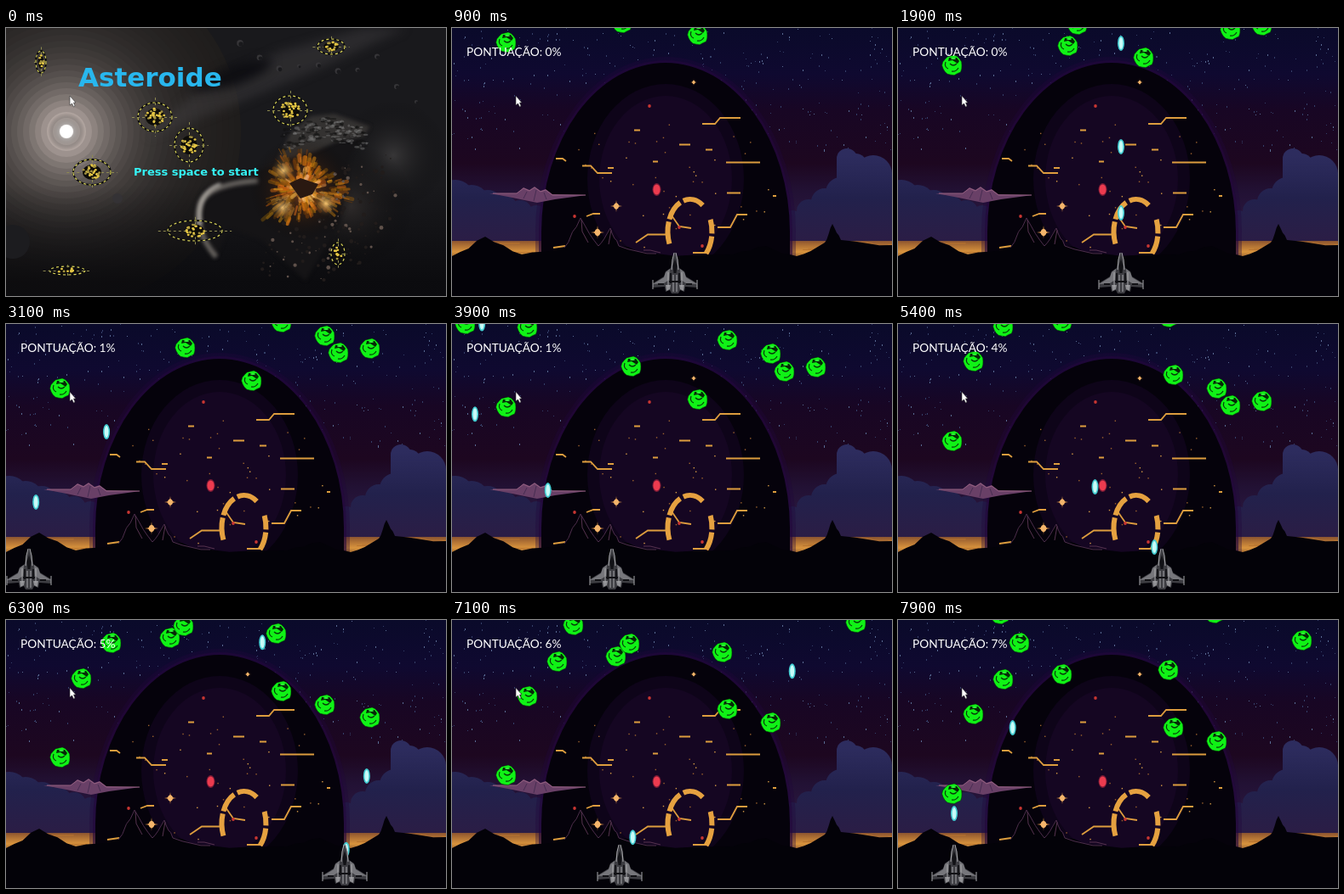
An HTML page with a canvas that plays this animation: 517 by 316 pixels, repeating every 8000 ms.

```html
<!DOCTYPE html>
<html lang="pt">
<head>
<meta charset="utf-8">
<title>Asteroide</title>
<style>
html, body { margin: 0; width: 100%; height: 100%; overflow: hidden; background: #000; }
canvas { display: block; width: 517px; height: 316px; }
</style>
</head>
<body>
<canvas id="stage" width="517" height="316"></canvas>
<script>
const W = 517, H = 316, LOOP = 8000, STEP = 100, GAME_START = 700, TAU = Math.PI * 2;
const FALL = 0.0268, BULLET_SPEED = 0.263, MUZZLE = 272, SPAWN_Y = -20, HIT_X = 16, HIT_Y = 14;
const stage = document.getElementById('stage').getContext('2d');

function randomizer(seed) {
  return () => (seed = (seed * 16807) % 2147483647) / 2147483647;
}

function layer(w, h, paint) {
  const canvas = document.createElement('canvas');
  canvas.width = w;
  canvas.height = h;
  paint(canvas.getContext('2d'));
  return canvas;
}

function fill(c, path, color) {
  c.fillStyle = color;
  c.fill(new Path2D(path));
}

function stroke(c, path, color, width = 1) {
  c.strokeStyle = color;
  c.lineWidth = width;
  c.stroke(new Path2D(path));
}

function oval(c, x, y, rx, ry, color) {
  c.fillStyle = color;
  c.beginPath();
  c.ellipse(x, y, rx, ry, 0, 0, TAU);
  c.fill();
}

function gradient(g, colors) {
  for (const [at, color] of colors) g.addColorStop(at, color);
  return g;
}

function glow(c, x, y, r, color) {
  c.fillStyle = gradient(c.createRadialGradient(x, y, 0, x, y, r), [[0, color], [1, 'transparent']]);
  c.fillRect(x - r, y - r, 2 * r, 2 * r);
}

function mirrored(c, centre, paint) {
  for (const side of [1, -1]) {
    c.save();
    c.translate(centre, 0);
    c.scale(side, 1);
    paint();
    c.restore();
  }
}

// Title screen
function paintSun(c) {
  for (let r = 205; r >= 9; r -= 7) {
    const v = 26 + 225 * Math.exp(-r / 52);
    oval(c, 71, 122, r, r, `rgb(${v * 1.03}, ${v * 0.96}, ${v * 0.93})`);
  }
  glow(c, 71, 122, 22, '#fff');
  oval(c, 71, 122, 8, 8, '#fff');
}

function paintBrokenPlanet(c, rnd) {
  c.filter = 'blur(2px)';
  fill(c, 'M221 215Q226 182 262 178L322 160 336 122 384 102 428 116 404 150 392 230 352 298 300 250 262 236 246 272Z', '#151416');
  fill(c, 'M318 158L334 124 358 104 386 101 428 116 420 128 388 134 362 146Z', '#343231');
  stroke(c, 'M247 270Q220 238 228 208Q236 184 296 180', '#66625e', 6);
  stroke(c, 'M228 232Q222 196 252 184', '#b4afa8', 4);
  c.filter = 'none';
  for (let i = 0; i < 160; i++) {
    const along = rnd(), x = 325 + along * 100;
    const y = 104 + Math.abs(along - 0.5) * 30 + rnd() * 26;
    oval(c, x, y, 1 + rnd() * 3, 0.6 + rnd() * 1.4, rnd() < 0.45 ? '#8886' : '#1118');
  }
}

function paintExplosion(c, rnd) {
  const cx = 348, cy = 190;
  glow(c, cx, cy, 62, 'rgba(150,75,28,.75)');
  c.lineCap = 'round';
  for (let i = 0; i < 420; i++) {
    const a = rnd() * TAU, near = rnd(), d = 8 + near * 44;
    const reach = 0.8 + 0.22 * Math.cos(3 * a - 0.6);
    const x = cx + Math.cos(a) * d * reach, y = cy + Math.sin(a) * d * reach * 0.9;
    const length = 2 + rnd() * 8;
    c.strokeStyle = `hsla(${24 + rnd() * 16}, 85%, ${18 + rnd() * 58 * (1.15 - near * 0.7)}%, .5)`;
    c.lineWidth = 1 + rnd() * 4;
    c.beginPath();
    c.moveTo(x, y);
    c.lineTo(x + Math.cos(a) * length, y + Math.sin(a) * length);
    c.stroke();
  }
  for (const [x, y] of [[325, 212], [326, 168], [376, 207]]) glow(c, x, y, 17, 'rgba(255,205,120,.85)');
  fill(c, 'M333 183L346 177 367 184 360 196 346 201Z', '#2a1911');
  for (let i = 0; i < 130; i++) {
    const a = rnd() * 2.6 - 0.5, d = 42 + rnd() * 68, r = 0.5 + rnd() * 2;
    oval(c, cx + Math.cos(a) * d, cy + Math.sin(a) * d, r, r, rnd() < 0.3 ? '#5f514a' : '#211c1b');
  }
}

const titleBack = layer(W, H, c => {
  const rnd = randomizer(71);
  c.fillStyle = '#19191c';
  c.fillRect(0, 0, W, H);
  paintSun(c);
  c.filter = 'blur(6px)';
  fill(c, 'M165 130L225 72 320 28 420 0H470L375 45 265 92Z', 'rgba(70,68,72,.4)');
  fill(c, 'M215 76Q260 36 312 36Q316 52 262 70Z', 'rgba(12,12,16,.9)');
  c.filter = 'none';
  c.fillStyle = gradient(c.createLinearGradient(0, 185, 0, 300), [[0, 'rgba(8,8,11,0)'], [1, 'rgba(8,8,11,.8)']]);
  c.fillRect(0, 185, W, H);
  glow(c, 455, 150, 65, 'rgba(75,73,73,.6)');
  glow(c, 405, 210, 75, 'rgba(62,56,53,.6)');
  oval(c, 8, 252, 20, 20, '#1c1c1f');
  oval(c, 131, 201, 6, 6, '#343235');
  paintBrokenPlanet(c, rnd);
  paintExplosion(c, rnd);
  for (let i = 0; i < 10; i++) {
    const x = 275 + i * 23, y = 10 + rnd() * 95, r = 2 + rnd() * 2;
    oval(c, x, y, r, r, '#363538');
    oval(c, x + 1, y + 1, r * 0.7, r * 0.7, '#19191c');
  }
});

// Centre and orbit radii
const orbiters = [[41, 40, 6, 13], [382, 22, 16, 9], [175, 105, 20, 17], [215, 138, 17, 20],
  [334, 97, 20, 17], [101, 170, 22, 15], [222, 239, 32, 12], [72, 286, 21, 5], [390, 266, 8, 13]];

function drawOrbiter(c, [x, y, rx, ry], turn) {
  const rnd = randomizer(x * 97 + y);
  const rw = Math.min(11, rx * 0.55), rh = Math.min(11, ry * 0.6);
  const orbit = new Path2D();
  orbit.ellipse(0, 0, rx, ry, 0, 0, TAU);
  c.save();
  c.translate(x, y);
  c.strokeStyle = '#0b0b0b';
  c.lineWidth = 1.8;
  c.stroke(orbit);
  c.setLineDash([3, 3]);
  c.lineDashOffset = -turn * 8;
  c.strokeStyle = '#d9d45a';
  c.lineWidth = 1.2;
  c.stroke(orbit);
  const cross = `M${-rx * 1.35} .5H${-rw}M${rw} .5H${rx * 1.35}M.5 ${-ry * 1.35}V${-rh}M.5 ${rh}V${ry * 1.35}`;
  stroke(c, cross, '#8d8950');
  c.setLineDash([]);
  oval(c, 0, 0, rw, rh, '#0d0c08');
  for (let i = 0; i < rw * rh * 0.32; i++) {
    const a = rnd() * TAU + turn, d = Math.sqrt(rnd());
    oval(c, Math.cos(a) * d * rw, Math.sin(a) * d * rh, 1.5, 1.3, rnd() < 0.7 ? '#e3c544' : '#a39240');
  }
  c.restore();
}

function drawTitle(c, t) {
  c.drawImage(titleBack, 0, 0);
  const turn = Math.min(t, 400) / 500;
  for (const o of orbiters) drawOrbiter(c, o, turn);
  c.fillStyle = '#28b7ee';
  c.font = 'bold 31px "DejaVu Sans", sans-serif';
  c.fillText('Asteroide', 85, 69);
  c.fillStyle = '#35f3f5';
  c.font = 'bold 13px "DejaVu Sans", sans-serif';
  c.fillText('Press space to start', 150, 174);
}

// Game scenery
function paintSky(c, rnd) {
  c.fillStyle = gradient(c.createLinearGradient(0, 0, 0, 275), [[0, '#0a0a2a'], [0.2, '#0f0930'],
    [0.35, '#180624'], [0.58, '#1d0720'], [0.7, '#221134'], [0.88, '#2d1a43'], [0.92, '#9a5f30'], [0.96, '#d9943d'], [1, '#6e4328']]);
  c.fillRect(0, 0, W, H);
  for (let i = 0; i < 300; i++) {
    c.fillStyle = rnd() < 0.3 ? '#596a92' : '#343f68';
    c.fillRect(Math.floor(rnd() * W), Math.floor(rnd() * 145), 1, 1 + Math.floor(rnd() * 2));
  }
  c.fillStyle = '#b9752f';
  for (let i = 0; i < 20; i++) c.fillRect(rnd() * W, 252 + rnd() * 16, 14 + rnd() * 25, 1);
}

function paintClouds(c) {
  const shade = gradient(c.createLinearGradient(0, 150, 0, 252), [[0, '#2d2c5e'], [0.5, '#22214c'], [1, '#2b1d45']]);
  const bank = (start, gap, top, slope) => {
    for (let i = 0; i < 6; i++) {
      const x = start + i * gap, r = 22 - i * 2, y = top + r + i * slope;
      oval(c, x, y, r, r, shade);
      c.fillRect(x - r, y, 2 * r, 251 - y);
    }
  };
  bank(4, 19, 179, 6);
  bank(514, -10, 172, -6);
  bank(495, -19, 150, 13);
}

function paintDome(c, rnd) {
  const dome = grow => `M${105 - grow} 275V241A${146 + grow} ${200 + grow} 0 0 1 ${397 + grow} 241V275Z`;
  fill(c, dome(7), 'rgba(32,8,57,.35)');
  fill(c, dome(3), 'rgba(35,8,60,.6)');
  fill(c, dome(0), '#05020b');
  oval(c, 251, 178, 92, 112, '#0e0419');
  oval(c, 251, 178, 78, 98, '#150622');

  for (let i = 0; i < 42; i++) {
    const a = rnd() * TAU, d = Math.sqrt(rnd());
    c.fillStyle = rnd() < 0.7 ? '#9d632e' : '#d69b46';
    c.fillRect(251 + Math.cos(a) * d * 125, 185 + Math.sin(a) * d * 85, 1.4, 1.4);
  }
  const circuits = 'M294 113h15l6-7h24M322 158.5h40M267 137.5h13M298 143.5h8M214 120.5h7M122 154h8l4 3'
    + 'M153 162.5h10l8 8.5h17M183 165h7M323 194.5h16M312 235h15l8-15h12M158 222l8-3h8'
    + 'M216 253l14-9.5h22M283 265h17M119 259l14-2M377 198h4M258 221l9 13 14 2M236 157.5h6';
  stroke(c, circuits, '#dd9d3e', 1.8);

  c.strokeStyle = '#e5a140';
  c.lineWidth = 6;
  for (const [from, to] of [[-1.87, -0.95], [-2.75, -2.02], [2.75, 3.45], [-0.38, 0.06], [0.15, 0.75]]) {
    c.beginPath();
    c.ellipse(279.5, 240, 26, 38, 0, from, to);
    c.stroke();
  }
  oval(c, 240.5, 190.5, 5, 7.5, '#7b1c36');
  oval(c, 240.5, 190.5, 4, 6, '#ec3b4f');
  for (const [x, y] of [[232, 92], [267, 235], [144, 222], [294, 257]]) oval(c, x, y, 1.8, 2, '#c93632');
  for (const [x, y, r] of [[193, 210, 7], [171, 241, 8], [284, 64, 4]]) {
    fill(c, `M${x} ${y - r}Q${x} ${y} ${x + r} ${y}Q${x} ${y} ${x} ${y + r}Q${x} ${y} ${x - r} ${y}Q${x} ${y} ${x} ${y - r}`, '#e09a4c');
    oval(c, x, y, r * 0.4, r * 0.5, '#f3b56c');
  }
}

function paintIsland(c) {
  fill(c, 'M44 195H76L84 188 91 191 97 187 104 192 110 190 118 196 158 197 121 202 100 206 66 199Z', '#694067');
  stroke(c, 'M48 195H76L84 189 91 192 97 188 104 193 110 191 118 197H157', '#946080');
  stroke(c, 'M88 193l-4 8m15-10l-3 13m12-10l3 8', '#472d52');
}

// Polyline through a few peaks, with small seeded kinks between them
function ridge(peaks, rnd, kinks = 4) {
  return peaks.slice(1).map(([x1, y1], i) => {
    const [x0, y0] = peaks[i];
    return Array.from({ length: kinks }, (_, k) => {
      const p = (k + 1) / kinks, bump = p < 1 ? (rnd() - 0.35) * 4 : 0;
      return `L${x0 + (x1 - x0) * p} ${y0 + (y1 - y0) * p + bump}`;
    }).join('');
  }).join('');
}

function paintMountains(c, rnd) {
  const peaks = [[0, 269], [39, 246], [82, 267], [132, 259], [151, 224], [172, 257], [186, 236], [196, 257],
    [240, 266], [330, 267], [369, 257], [405, 269], [438, 253], [447, 231], [457, 250], [517, 256]];
  fill(c, `M0 269${ridge(peaks, rnd)}V316H0Z`, '#030208');
  stroke(c, `M132 259${ridge(peaks.slice(3, 9), rnd)}`, '#4d2e4c');
  stroke(c, 'M152 226l1 14 7 13M187 238l-3 17M225 262h8l12 3', '#56334f');
}

const gameBack = layer(W, H, c => {
  const rnd = randomizer(2024);
  paintSky(c, rnd);
  paintClouds(c);
  paintDome(c, rnd);
  paintIsland(c);
  paintMountains(c, rnd);
});

const asteroid = layer(30, 30, c => {
  const rnd = randomizer(33);
  c.translate(15, 15);
  c.beginPath();
  for (let i = 0; i < 18; i++) {
    const r = 11 + rnd() * 1.6;
    c.lineTo(Math.cos(i / 18 * TAU) * r, Math.sin(i / 18 * TAU) * r);
  }
  c.closePath();
  c.fillStyle = '#10f216';
  c.fill();
  c.strokeStyle = '#063408';
  c.lineWidth = 0.6;
  c.stroke();
  fill(c, 'M-4 -9L5 -9 8 -5 6 -2 0 -6 -5 -5Z', '#062807');
  stroke(c, 'M-8 -4q-2 6 3 8M7 3q-3 5-8 4M-3 -2q4 4 8 0', '#07380a', 1.2);
  oval(c, 1, -8, 3, 1, '#31ff3b');
});

const ship = layer(56, 54, c => {
  mirrored(c, 28, () => {
    fill(c, 'M0 1L3 9 5 20 11 24 13 30 26 38V43L12 42 11 48 6 46 4 50H0Z', '#3d3d42');
    fill(c, 'M6 21L11 25 13 31 26 39 13 38 7 34Z', '#76767b');
    fill(c, 'M5 40H11L10 47 6 45Z', '#909094');
    stroke(c, 'M1 2L3 10 4 22M8 25V42M2 28V48M26 34V45', '#a9a9ac');
    stroke(c, 'M5 26V38M13 39H20M0 36H7', '#111115', 1.8);
  });
  fill(c, 'M28 9L30.5 18 29.5 26H26.5L25.5 18Z', '#121216');
});

// Turning points of the ship: time, x
const route = [[0, 262], [2002, 262], [2895, 27], [3284, 27], [4492, 343.5], [5005, 208],
  [5400, 310], [6095, 450], [7650, 59], [7680, 66], [LOOP, 66]];

function shipX(t) {
  const i = route.findIndex(([at]) => at > t);
  const [t0, x0] = route[i - 1], [t1, x1] = route[i];
  return x0 + (x1 - x0) * (t - t0) / (t1 - t0);
}

// x and entry time; every rock falls at the same speed
const rocks = [[64, -488], [289, -152], [200, 370], [391, 1079], [428, 1266], [211, 1303], [375, 1831],
  [324, 2428], [89, 2996], [16, 3155], [124, 4542], [193, 4766], [318, 4952], [209, 5293],
  [143, 6146], [475, 6258], [120, 7415], [372, 7452]].map(([x, start]) => ({ x, start, end: Infinity }));

// Each shot leaves from the ship and ends at the first rock in its way
const shots = [934, 1398, 1695, 1985, 2235, 2549, 2864, 3270, 3611, 3931, 4216, 4650,
  5096, 5366, 5740, 5965, 6295, 7040, 7349, 7733].map(start => ({ x: shipX(start), start, end: Infinity }));

const shotY = (shot, t) => MUZZLE - (t - shot.start) * BULLET_SPEED;
const rockY = (rock, t) => SPAWN_Y + (t - rock.start) * FALL;

for (const shot of shots) {
  let target = null;
  for (const rock of rocks) {
    if (rock.end < Infinity || Math.abs(rock.x - shot.x) > HIT_X) continue;
    const meet = (MUZZLE - SPAWN_Y - HIT_Y + BULLET_SPEED * shot.start + FALL * rock.start) / (BULLET_SPEED + FALL);
    if (shotY(shot, meet) > 4 && meet < shot.end) {
      shot.end = meet;
      target = rock;
    }
  }
  if (target) target.end = shot.end;
}

function drawGame(c, t) {
  c.drawImage(gameBack, 0, 0);
  const alive = o => t >= o.start && t < o.end;
  for (const rock of rocks.filter(alive)) c.drawImage(asteroid, rock.x - 15, Math.round(rockY(rock, t)) - 15);
  for (const shot of shots.filter(alive)) {
    const y = shotY(shot, t);
    oval(c, shot.x, y, 4, 9, '#43cdd2');
    oval(c, shot.x, y, 2.4, 7, '#c8fbf8');
  }
  c.drawImage(ship, Math.round(shipX(t)) - 28, 263);
  const score = rocks.filter(rock => t >= rock.end).length;
  c.fillStyle = '#fff';
  c.font = '13.7px Lato, sans-serif';
  c.fillText(`PONTUAÇÃO: ${score}%`, 17, 33);
}

function drawCursor(c) {
  const arrow = 'M75 80V91L77.5 89 79.5 93 81 92 79.5 88H82Z';
  fill(c, arrow, '#fff');
  stroke(c, arrow, '#333', 0.6);
}

function frame(now) {
  const t = Math.floor((now % LOOP) / STEP) * STEP;
  (t < GAME_START ? drawTitle : drawGame)(stage, t);
  drawCursor(stage);
  requestAnimationFrame(frame);
}
frame(0);
</script>
</body>
</html>
```
